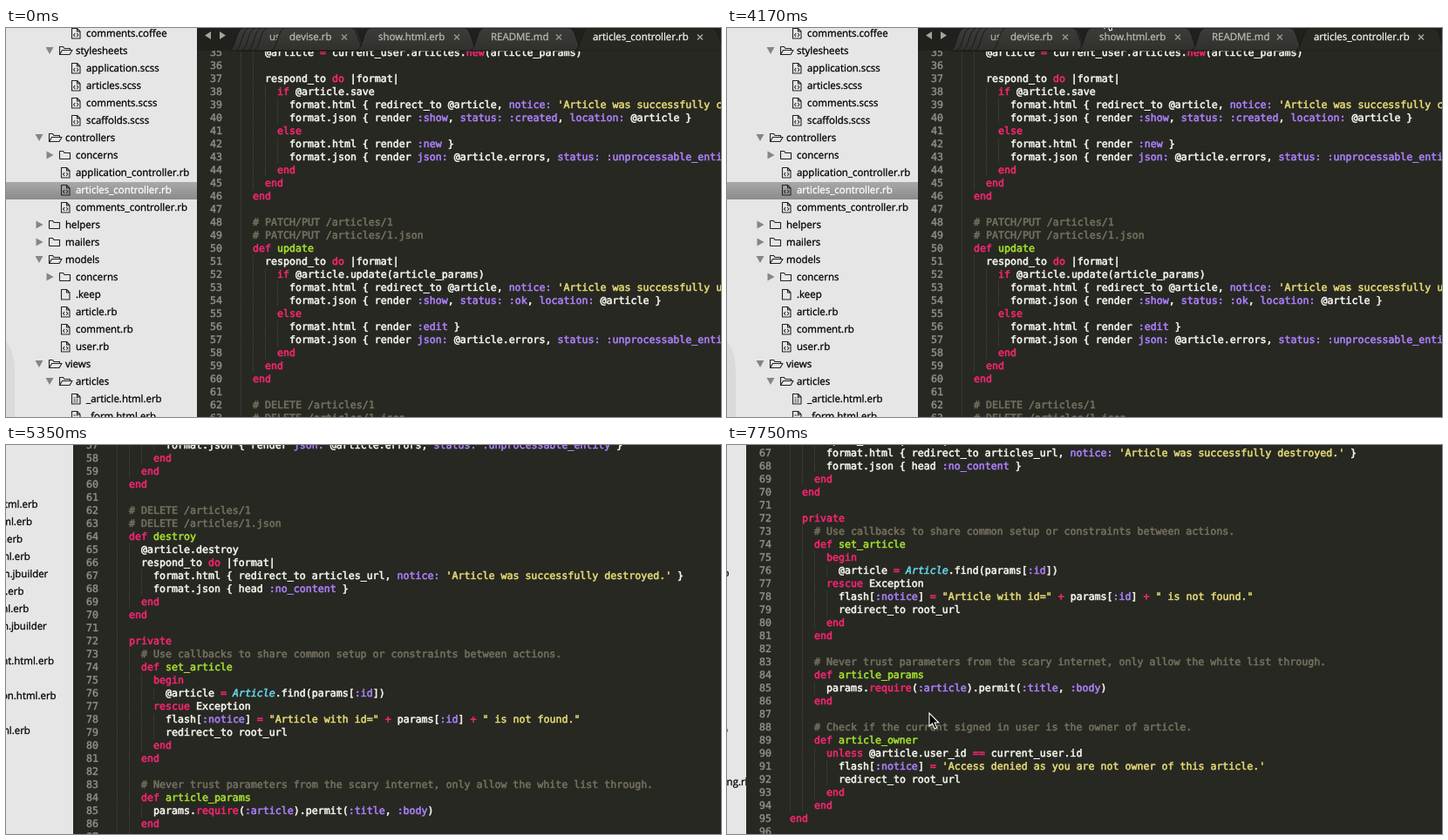
An HTML page for the animation above (8 s loop, 820 px wide and 447 px high).

```html
<!DOCTYPE html>
<html lang="en">
<head>
<meta charset="utf-8">
<title>Editor pan</title>
<style>
  html, body { margin: 0; width: 100%; height: 100%; overflow: hidden; background: #272822; }
  svg { display: block; width: 820px; height: 447px; }
  text { white-space: pre; text-rendering: geometricPrecision; }
  text, tspan { fill: currentColor; stroke: currentColor; }
  .ui { font: 11.45px "Open Sans", "Noto Sans", sans-serif; stroke-width: .3px; }
  .code { font: 11.628px "DejaVu Sans Mono", monospace; color: #f8f8f2; stroke-width: .55px; }
  .num { color: #8f908a; stroke-width: .4px; text-anchor: end; }
  .key { color: #f92672; }
  .name { color: #a6e22e; }
  .sym { color: #ae81ff; }
  .str { color: #e6db74; }
  .rem { color: #75715e; }
  .type { color: #66d9ef; font-style: italic; }
  .icon { fill: none; stroke: #222; stroke-width: 1.1; stroke-linejoin: round; }
  .arrow { fill: #858585; }
  .guide { stroke: #464740; stroke-dasharray: 1 1; }
</style>
</head>
<body>
<svg viewBox="0 0 820 447">
  <defs>
    <linearGradient id="pick" x2="0" y2="1">
      <stop stop-color="#a9a9a9"/><stop offset="1" stop-color="#8b8b8b"/>
    </linearGradient>
    <linearGradient id="bar" x2="0" y2="1">
      <stop stop-color="#3c3d38"/><stop offset="1" stop-color="#30312c"/>
    </linearGradient>
  </defs>
  <g id="world"></g>
  <path id="cursor" d="M0 0V15.2L3.5 12L6 18L8.6 16.9L6.1 11H10.8Z" fill="#000" stroke="#fff" stroke-width="1.1"/>
</svg>
<script>
const LOOP = 8000, ROW = 20, LINE = 15, CHAR = 7, EDGE = 219, CODE_X = 269, FIRST = 35;

// Sidebar rows: depth, kind (v open, > closed, < code, # markup, - plain), name
const tree = `3<comments.coffee
2vstylesheets
3<application.scss
3<articles.scss
3<comments.scss
3<scaffolds.scss
1vcontrollers
2>concerns
2<application_controller.rb
2<articles_controller.rb
2<comments_controller.rb
1>helpers
1>mailers
1vmodels
2>concerns
2-.keep
2<article.rb
2<comment.rb
2<user.rb
1vviews
2varticles
3#_article.html.erb
3#_form.html.erb
3#edit.html.erb
3#index.html.erb
3#index.json.jbuilder
3#new.html.erb
3#show.html.erb
3#show.json.jbuilder
2vcomments
3#_comment.html.erb
2vlayouts
3#application.html.erb
2vwelcome
3#index.html.erb
1>users
0>bin
0vconfig
1>environments
1vinitializers
2<assets.rb
2<backtrace_silencers.rb
2<cookies_serializer.rb
2<devise.rb
2<filter_parameter_logging.rb
2<inflections.rb
2<mime_types.rb
2<session_store.rb`.split('\n');
const SELECTED = 9;

const source = `    @article = current_user.articles.new(article_params)

    respond_to do |format|
      if @article.save
        format.html { redirect_to @article, notice: 'Article was successfully created.' }
        format.json { render :show, status: :created, location: @article }
      else
        format.html { render :new }
        format.json { render json: @article.errors, status: :unprocessable_entity }
      end
    end
  end

  # PATCH/PUT /articles/1
  # PATCH/PUT /articles/1.json
  def update
    respond_to do |format|
      if @article.update(article_params)
        format.html { redirect_to @article, notice: 'Article was successfully updated.' }
        format.json { render :show, status: :ok, location: @article }
      else
        format.html { render :edit }
        format.json { render json: @article.errors, status: :unprocessable_entity }
      end
    end
  end

  # DELETE /articles/1
  # DELETE /articles/1.json
  def destroy
    @article.destroy
    respond_to do |format|
      format.html { redirect_to articles_url, notice: 'Article was successfully destroyed.' }
      format.json { head :no_content }
    end
  end

  private
    # Use callbacks to share common setup or constraints between actions.
    def set_article
      begin
        @article = Article.find(params[:id])
      rescue Exception
        flash[:notice] = "Article with id=" + params[:id] + " is not found."
        redirect_to root_url
      end
    end

    # Never trust parameters from the scary internet, only allow the white list through.
    def article_params
      params.require(:article).permit(:title, :body)
    end

    # Check if the current signed in user is the owner of article.
    def article_owner
      unless @article.user_id == current_user.id
        flash[:notice] = 'Access denied as you are not owner of this article.'
        redirect_to root_url
      end
    end
end
`.split('\n');

const TOKEN = /(?<rem>#.*)|(?<str>'[^']*'|"[^"]*")|(?<=def )(?<name>\w+)|(?<key>\b(?:def|do|if|else|end|private|begin|rescue|unless|new(?=\()|require)\b|[=+]+)|(?<sym>:\w+|\w+:)|(?<type>\bArticle\b)/g;

const paint = line => line.replace(TOKEN, (word, ...rest) => {
  const groups = rest.pop();
  const kind = Object.keys(groups).find(k => groups[k] !== undefined);
  return `<tspan class="${kind}">${word}</tspan>`;
});

const rect = (x, y, w, h, fill) => `<rect x="${x}" y="${y}" width="${w}" height="${h}" fill="${fill}"/>`;
const path = (d, attrs) => `<path d="${d}" ${attrs}/>`;
const label = (x, y, str, color) => `<text class="ui" x="${x}" y="${y}" color="${color}">${str}</text>`;

function icon(kind, x, y) {
  const line = d => path(d, 'class="icon"');
  if (kind === '>' || kind === 'v') {
    const open = kind === 'v';
    const arrow = open ? `M${x - 34.5} ${y - 4}h9l-4.5 8z` : `M${x - 33.5} ${y - 4.5}v9l8-4.5z`;
    const tab = `M${x - 18.5} ${y + 4.5}v-9h4l1.5 2h6.5v2`;
    return path(arrow, 'class="arrow"') +
      line(tab + (open ? 'h2.5l-3 5h-11.5l3-5h9' : 'v5h-12'));
  }
  let out = line(`M${x - 16.5} ${y - 5.5}h6l3.5 3.5v8h-9.5zm6 0v3.5h3.5`);
  if (kind === '<') out += line(`M${x - 12.8} ${y}l-1.7 2l1.7 2m2 -4l1.7 2l-1.7 2`);
  if (kind === '#') out += line(`M${x - 14.5} ${y - 1}h2m1 0h2m-5 2.5h2m1 0h2m-5 2.3h2m1 0h2`);
  return out;
}

function sidebar() {
  let out = rect(0, 0, EDGE, 960, '#e6e6e6') +
    path('M0 360Q10 372 10 396V447H0Z', 'fill="#dadada"') +
    rect(0, 177, EDGE, ROW, 'url(#pick)');
  tree.forEach((row, i) => {
    const x = 56 + 12 * row[0], y = 6 + ROW * i;
    out += icon(row[1], x, y) + label(x, y + 4, row.slice(2), i === SELECTED ? '#fff' : '#000');
  });
  return out;
}

const indent = line => line.search(/\S/);

function depth(i) {
  if (source[i]) return indent(source[i]);
  return Math.min(indent(source[i - 1] || ''), indent(source[i + 1] || ''));
}

function code() {
  let out = rect(EDGE, 0, 900, 960, '#272822');
  source.forEach((line, i) => {
    const mid = 28 + LINE * i, lead = depth(i);
    for (let c = 0; c < lead; c += 2) {
      out += path(`M${CODE_X + .5 + c * CHAR} ${mid - 7}v${LINE}`, `class="guide" stroke-dashoffset="${i % 2}"`);
    }
    out += `<text class="code num" x="248" y="${mid + 4}">${FIRST + i}</text>`;
    if (line) out += `<text class="code" x="${CODE_X + lead * CHAR}" y="${mid + 4}">${paint(line.trim())}</text>`;
  });
  return out;
}

function tabs() {
  const shape = (x, w, fill) =>
    path(`M${x} 26C${x + 8} 24 ${x + 7} 1 ${x + 16} 0H${x + w - 16}C${x + w - 7} 1 ${x + w - 8} 24 ${x + w} 26Z`,
      `fill="${fill}" stroke="#191a16"`);
  const close = (x, color) => path(`M${x - 3} 7.5l6 6m0 -6l-6 6`, `stroke="${color}" stroke-width="1.5"`);
  let out = rect(EDGE, 0, 900, 26, '#20211c') +
    path('M235 4v9l-7-4.5zM245 4v9l7-4.5z', 'fill="#a4a59f"');
  for (let x = 256; x < 288; x += 7) out += shape(x, 130, 'url(#bar)');
  out += label(302, 14, 'us', '#aaaba5');
  [[304, 108, 325, 'devise.rb', 388], [402, 140, 427, 'show.html.erb', 517],
   [532, 130, 556, 'README.md', 634]].forEach(([x, w, tx, name, cx]) => {
    out += shape(x, w, 'url(#bar)') + label(tx, 14, name, '#b9bab4') + close(cx, '#92938d');
  });
  return out + shape(652, 174, '#272822') + rect(654, 25.4, 170, 1.2, '#272822') +
    label(673, 14, 'articles_controller.rb', '#f4f4f0') + close(796, '#a5a6a0');
}

// Each stretch: start, end, and the poses taken at even steps between them
const camera = [
  [0, 0, [[0, 0]]],
  [4610, 5650, [[12, 18], [33, 59], [62, 130], [94, 214], [119, 290], [142, 358], [160, 412], [175, 453]]],
  [5800, 6250, [[184, 473], [190, 486], [195, 495], [197, 499]]]
];
const pointer = [
  [0, 0, [[-50, -50]]],
  [600, 900, [[324, 28], [376, 118], [414, 195]]],
  [1200, 2080, [[416, 206], [386, 217], [328, 219], [258, 212], [192, 200], [146, 190], [127, 186]]],
  [2380, 2830, [[112, 250], [71, 428], [98, 290], [127, 181]]],
  [3130, 4170, [[127, 186], [202, 262], [324, 295], [468, 270], [560, 188], [538, 96], [474, 24], [433, -15]]],
  [4910, 4910, [[432, -18]]],
  [7450, 7750, [[400, 70], [292, 226], [232, 308]]]
];

function poseAt(track, t) {
  const [from, to, poses] = track.filter(s => s[0] <= t).pop();
  if (to === from) return poses[0];
  const step = Math.floor((t - from) / (to - from) * (poses.length - 1) + .05);
  return poses[Math.min(step, poses.length - 1)];
}

const world = document.getElementById('world');
const cursor = document.getElementById('cursor');
const move = (node, x, y) => node.setAttribute('transform', `translate(${x} ${y})`);

function draw(t) {
  const [cx, cy] = poseAt(camera, t);
  move(world, -cx, -cy);
  move(cursor, ...poseAt(pointer, t));
}

function tick(now) {
  draw(now % LOOP);
  requestAnimationFrame(tick);
}

world.innerHTML = sidebar() + code() + tabs();
draw(0);
requestAnimationFrame(tick);
</script>
</body>
</html>
```
